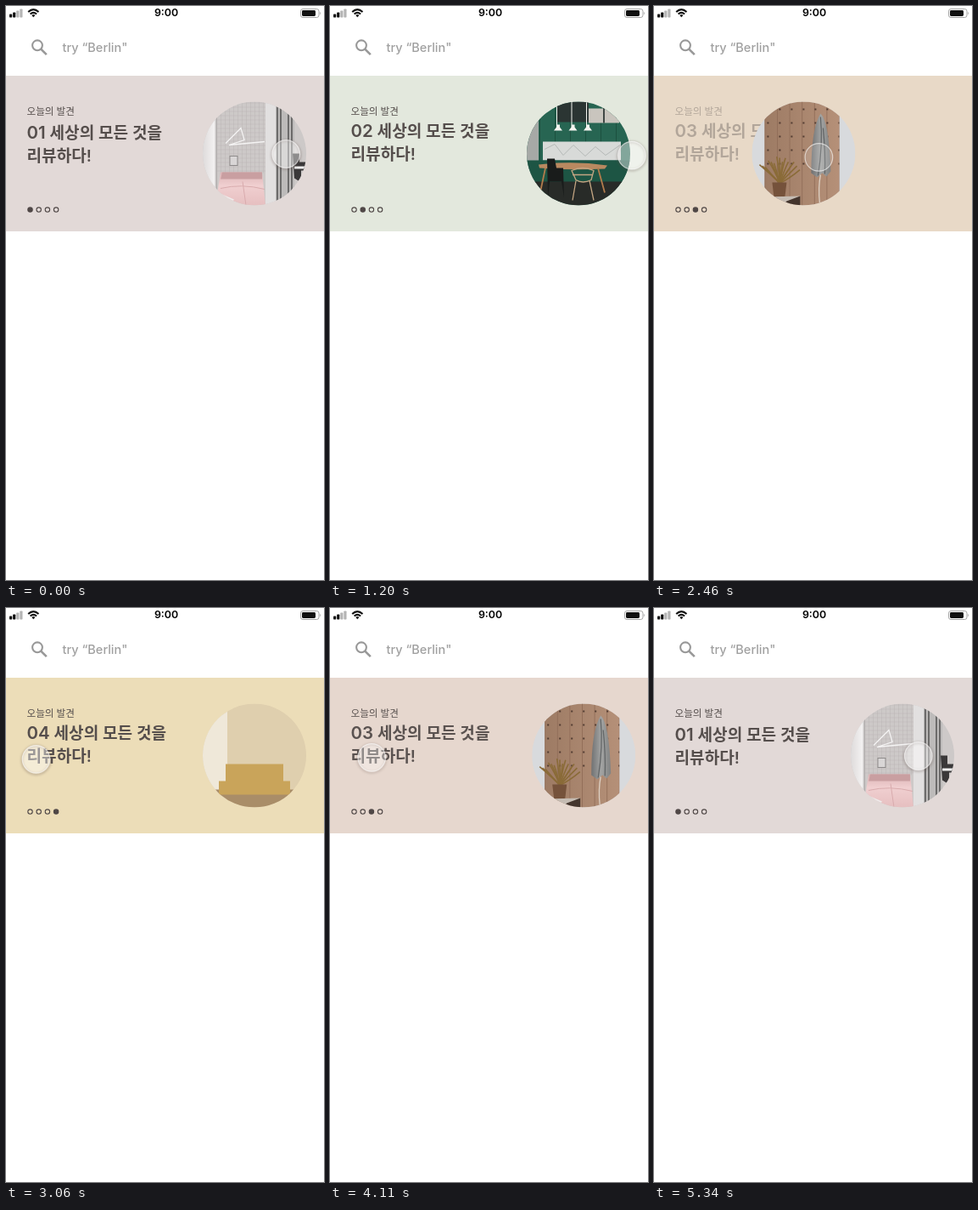
Recreate the animation shown at these times as an HTML page. Size 375 by 675 pixels, loop 5400 ms.

```html
<!DOCTYPE html>
<html lang="ko">
<head>
<meta charset="utf-8">
<title>Review carousel</title>
<style>
html, body { margin: 0; width: 100%; height: 100%; overflow: hidden; background: #fff; }
svg { display: block; width: 375px; height: 675px; }
text { font-family: Inter, "Noto Sans CJK KR", "Noto Sans CJK JP", sans-serif; }
.heading { fill: #554e4c; }
.small { font-size: 11.6px; font-weight: 500; }
.big { font-size: 19.1px; font-weight: 600; }
.number { font-size: 20.5px; }
.line { fill: none; }
</style>
</head>
<body>
<svg viewBox="0 0 375 675">
  <defs>
    <clipPath id="round"><circle r="61"/></clipPath>
    <pattern id="tiles" width="5" height="5" patternUnits="userSpaceOnUse">
      <path class="line" d="M0 0H5M0 0V5" stroke="#b3afae" stroke-width=".7"/>
    </pattern>
    <pattern id="planks" width="14.6" height="122" x="-46" y="-61" patternUnits="userSpaceOnUse">
      <path d="M0 0V122" stroke="#8d6a55" stroke-width="1.6"/>
    </pattern>
    <pattern id="pegs" width="14" height="16" x="-49" y="-59" patternUnits="userSpaceOnUse">
      <circle cx="7" cy="7" r="1.1" fill="#3d2a22"/>
    </pattern>
    <pattern id="doors" width="18" height="122" x="-46" y="-61" patternUnits="userSpaceOnUse">
      <path d="M0 0V122" stroke="#1c503f" stroke-width="2"/>
    </pattern>
    <linearGradient id="curtain"><stop offset="0" stop-color="#dedbdb"/><stop offset=".8" stop-color="#f3f1f1"/><stop offset="1" stop-color="#a5a1a0"/></linearGradient>
    <linearGradient id="wood"><stop offset="0" stop-color="#9d7b64"/><stop offset="1" stop-color="#b59078"/></linearGradient>
    <linearGradient id="cloth"><stop offset="0" stop-color="#707273"/><stop offset=".5" stop-color="#a3a4a3"/><stop offset="1" stop-color="#808282"/></linearGradient>
    <linearGradient id="bed" x2="0" y2="1"><stop offset="0" stop-color="#dcb3b5"/><stop offset=".4" stop-color="#f0cfd0"/><stop offset="1" stop-color="#e6bfc0"/></linearGradient>
    <filter id="shade" x="-50%" y="-50%" width="200%" height="200%"><feGaussianBlur stdDeviation="1.5"/></filter>
    <path id="pipe" d="M0 -61V61" stroke="#4a4949" stroke-width="1.4"/>
    <path id="lamp" d="M-2 -34V-61H-1V-34H2V-31L5 -27H-5L-2 -31Z" fill="#f3f4ef"/>
  </defs>

  <rect width="375" height="675" fill="#fff"/>

  <!-- status bar -->
  <g id="signal"></g>
  <path class="line" d="M26.2 7Q32.3 1.2 38.500 7M28.600 9.600Q32.300 6.100 36.100 9.600" stroke="#111" stroke-width="2"/>
  <path d="M30.300 11Q32.300 9.200 34.400 11L32.300 13.300Z" fill="#111"/>
  <text x="189" y="12.400" font-size="12.400" font-weight="600" text-anchor="middle">9:00</text>
  <rect class="line" x="347.500" y="3.500" width="21.500" height="10" rx="2.600" stroke="#a5a5a5"/>
  <rect x="349" y="5" width="16" height="7" rx="1.400" fill="#111"/>
  <path d="M370.300 6.700Q372.200 8.500 370.300 10.300Z" fill="#a5a5a5"/>

  <!-- search field -->
  <g class="line" stroke="#989898" stroke-width="2.100">
    <circle cx="37" cy="46.300" r="5.900"/><path d="M41.200 50.600L47.800 57.200" stroke-width="2.600"/>
  </g>
  <text x="66.500" y="53.500" font-size="14.500" font-weight="500" fill="#a0a0a0">try “Berlin"</text>

  <rect id="band" y="82" width="375" height="183"/>
  <g id="headings"></g>
  <g id="dots" stroke="#4f4746" stroke-width="1.100"></g>

  <!-- bedroom -->
  <g class="photo"><g clip-path="url(#round)">
    <rect x="-61" y="-61" width="122" height="122" fill="#cdc9c8"/>
    <rect x="-46" y="-61" width="60" height="84" fill="url(#tiles)"/>
    <rect x="-61" y="-61" width="17" height="122" fill="url(#curtain)"/>
    <rect x="13" y="-61" width="12" height="122" fill="#e2e0e0"/>
    <path class="line" d="M-34 -12L-22 -24L-16 -30L-12 -16L-30 -10L12 -14" stroke="#f4f3f3" stroke-width="1.300"/>
    <rect x="-29" y="3" width="9" height="11" fill="#d9d6d6" stroke="#8d8a8a"/>
    <path d="M-40 22H9L13 61H-46Z" fill="url(#bed)"/>
    <path d="M-38 22H9V30H-40Z" fill="#c99fa1"/>
    <path class="line" d="M-40 41Q-15 35 12 42M-14 33L-10 61" stroke="#d8abad"/>
    <path d="M-61 45L-38 48L-24 54L-30 61H-61Z" fill="#efecec"/>
    <rect x="25" y="-61" width="22" height="122" fill="#bdbbba"/>
    <use href="#pipe" x="27"/><use href="#pipe" x="31"/><use href="#pipe" x="40"/><use href="#pipe" x="44"/>
    <path d="M45 0H53V10H61V20H55V34L47 29Z" fill="#3a3839"/>
    <path d="M47 15H61V18H47Z" fill="#eee"/>
  </g></g>

  <!-- kitchen -->
  <g class="photo"><g clip-path="url(#round)">
    <rect x="-61" y="-61" width="122" height="122" fill="#276552"/>
    <rect x="-46" y="-61" width="107" height="95" fill="url(#doors)"/>
    <rect x="-61" y="-61" width="14" height="122" fill="#a6a9a6"/>
    <rect x="-26" y="-61" width="38" height="24" fill="#2b3533"/>
    <rect x="12" y="-53" width="36" height="17" fill="#c9c5be"/>
    <path d="M30 -61V-36" stroke="#1f2927" stroke-width="1.600"/>
    <rect x="-42" y="-14" width="92" height="22" fill="#d8dad8"/>
    <path class="line" d="M-40 -5L-28 -11L-18 2L-6 -10L8 3L20 -8L32 2L49 -10" stroke="#b4b8b6"/>
    <rect x="-61" y="8" width="122" height="26" fill="#1d5544"/>
    <rect x="-61" y="33" width="122" height="28" fill="#282b28"/>
    <use href="#lamp" x="-24"/><use href="#lamp" x="-6.500"/><use href="#lamp" x="11"/>
    <path d="M-47 13Q-6 8 34 14L31 18Q-8 20 -46 17Z" fill="#b98960"/>
    <path d="M-39 17L-46 50M23 17L31 46" stroke="#b17b4c" stroke-width="1.800"/>
    <path d="M-37 6H-28L-26 17H-18L-17 52L-20 33H-34L-36 52Z" fill="#191c1b"/>
    <path class="line" d="M-8 20Q5 14 18 20L15 31Q5 36 -3 31ZM-3 32L-7 55M13 32L18 55M-7 25H17" stroke="#c3a582" stroke-width="1.300"/>
  </g></g>

  <!-- hallway -->
  <g class="photo"><g clip-path="url(#round)">
    <rect x="-61" y="-61" width="122" height="122" fill="#d8dadd"/>
    <rect x="-46" y="-61" width="88" height="122" fill="url(#wood)"/>
    <rect x="-46" y="-61" width="88" height="122" fill="url(#planks)"/>
    <rect x="-46" y="-61" width="88" height="80" fill="url(#pegs)"/>
    <path d="M20 -47Q30 -38 32 21L27 27L22 23L16 28L9 23Q9 -30 20 -47Z" fill="url(#cloth)"/>
    <path class="line" d="M20 -43Q23 -10 17 26M23 -30Q26 0 25 24" stroke="#626566" stroke-width="1.300"/>
    <path class="line" d="M20 25Q17 40 19 58" stroke="#ddd0c3" stroke-width="1.300"/>
    <g id="straw" class="line" stroke="#8a6b38" stroke-width="1.600"></g>
    <path d="M-37 34H-20L-22 51H-35Z" fill="#75523b"/>
    <path d="M-46 51L-4 50L-16 61H-46Z" fill="#c5bcb3"/>
    <path d="M-20 56L-4 50V61H-24Z" fill="#44352d"/>
  </g></g>

  <!-- living room -->
  <g class="photo"><g clip-path="url(#round)">
    <rect x="-61" y="-61" width="122" height="122" fill="#dfcfae"/>
    <rect x="-61" y="-61" width="29" height="122" fill="#efe8d9"/>
    <rect x="-61" y="40" width="122" height="21" fill="#a98d68"/>
    <path d="M-34 10H34V30H42V46H-42V30H-34Z" fill="#c9a45a"/>
  </g></g>

  <g id="finger">
    <circle id="shadow" cy="1" r="16.600" fill="none" stroke="#5b4a45" stroke-width="2" filter="url(#shade)"/>
    <circle id="pad" r="16.300" fill="#fff" stroke="#fff" stroke-opacity=".6" stroke-width="1.200"/>
  </g>
</svg>

<script>
const LOOP = 5400, GAP = 382, SPAN = 420;
const PAGES = 4, TURNS = PAGES - 1;
const starts = [586, 1407, 2319, 3269, 4080, 4670];
const forward = { dir: 1, x: 311, reach: 227 };
const backward = { dir: -1, x: 43, reach: 87 };
const tints = [[226, 217, 215], [227, 232, 221], [230, 215, 206], [236, 221, 184]];

const $ = id => document.getElementById(id);
const clamp = v => Math.min(1, Math.max(0, v));
const each = (n, make) => Array.from({ length: n }, (_, i) => make(i));

function add(parent, tag, attrs, text = "") {
  const el = document.createElementNS("http://www.w3.org/2000/svg", tag);
  for (const k in attrs) el.setAttribute(k, attrs[k]);
  el.textContent = text;
  parent.append(el);
  return el;
}

each(4, i => add($("signal"), "rect", {
  x: 4 + i * 4.1, y: 9.5 - i * 2, width: 3.2, height: 4 + i * 2, rx: .7, fill: i < 2 ? "#111" : "#b5b5b5"
}));

const headings = each(PAGES, i => {
  const g = add($("headings"), "g", { class: "heading" }), y = i ? 154 : 156;
  add(g, "text", { class: "small", x: 24.5, y: 127.5 }, "오늘의 발견");
  const title = add(g, "text", { class: "big", x: 24.5, y });
  add(title, "tspan", { class: "number" }, `0${i + 1}`);
  title.append(" 세상의 모든 것을");
  add(g, "text", { class: "big", x: 24.5, y: y + 26.5 }, "리뷰하다!");
  return g;
});
const dots = each(PAGES, i => add($("dots"), "circle", { cx: 28.5 + i * 10.2, cy: 239.6, r: 2.7 }));
const photos = [...document.querySelectorAll(".photo")];

each(15, i => {
  const x = -52 + i * 3.4, y = 2 + Math.abs(i - 7) * 1.6 + (i % 3) * 3;
  add($("straw"), "path", { d: `M-28 35Q${(x - 28) / 2} ${y + 10} ${x} ${y}` });
});

const settle = u => 1 - (1 - u * u) ** 3;
const overshoot = u => 1 + 3.6 * (u - 1) ** 3 + 2.6 * (u - 1) ** 2;
const swipeKind = i => i % starts.length < TURNS ? forward : backward;

// The finger drags the page, lets go within reach, then travels to the next swipe.
function pose(t) {
  if (t < starts[0]) t += LOOP;
  const i = starts.filter(s => s <= t).length - 1;
  const { dir, x, reach } = swipeKind(i);
  const next = i + 1 < starts.length ? starts[i + 1] : starts[0] + LOOP;
  const from = i < TURNS ? i : starts.length - i;
  const end = starts[i] + SPAN;
  const moved = settle(clamp((t - starts[i]) / SPAN));
  const held = x - dir * Math.min(GAP * moved, reach);
  const back = overshoot(clamp((t - end) / (next - end)));
  return {
    page: from + dir * moved,
    active: moved > .6 ? from + dir : from,
    x: held + (swipeKind(i + 1).x - held) * back,
    y: 176 - 2 * Math.cos(2 * Math.PI * t / LOOP),
    press: clamp(moved * 20) * clamp((reach / GAP + .1 - moved) * 10)
  };
}

function tint(page) {
  const i = Math.min(Math.floor(page), TURNS - 1);
  return `rgb(${tints[i].map((c, k) => Math.round(c + (tints[i + 1][k] - c) * (page - i)))})`;
}

function draw(t) {
  const { page, active, x, y, press } = pose(t);
  $("band").setAttribute("fill", tint(page));
  photos.forEach((g, i) => g.setAttribute("transform", `translate(${293 + (i - page) * GAP} 173.5)`));
  headings.forEach((g, i) => g.setAttribute("opacity", clamp(1 - 2.1 * Math.abs(i - page))));
  dots.forEach((d, i) => d.setAttribute("fill", i === active ? "#4f4746" : "none"));
  $("finger").setAttribute("transform", `translate(${x} ${y})`);
  $("pad").setAttribute("fill-opacity", .42 - .27 * press);
  $("shadow").setAttribute("opacity", .4 * (1 - .8 * press));
}

const begin = performance.now();
function tick() {
  draw((performance.now() - begin) % LOOP);
  requestAnimationFrame(tick);
}
tick();
</script>
</body>
</html>
```
